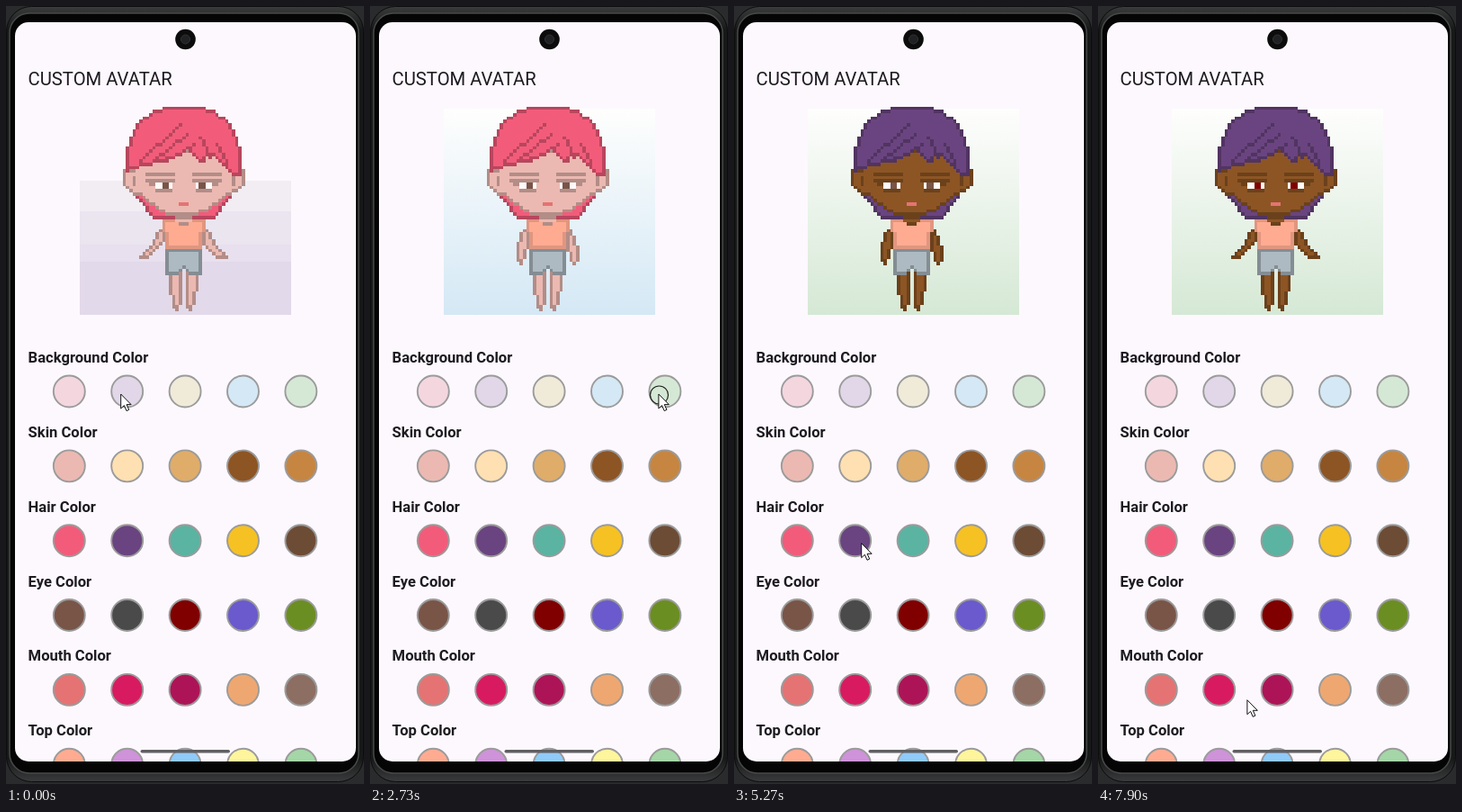
An HTML page with a canvas that plays this animation: 398 px wide and 864 px high, repeating every 8000 ms.

```html
<!DOCTYPE html>
<html lang="en">
<head>
<meta charset="utf-8">
<title>Custom avatar</title>
<style>
  html, body { margin: 0; width: 398px; height: 864px; overflow: hidden; background: #2a2b2c; }
  svg, canvas, #backdrop { position: absolute; left: 0; top: 0; }
  #backdrop { left: 82px; top: 114px; width: 235px; height: 229px; }
  #avatar { left: 82px; top: 108px; width: 235px; height: 235px; image-rendering: pixelated; }
  text { font-family: Roboto, Arial, sans-serif; fill: #1d1b20; }
  .title { font-size: 20.25px; }
  .label { font-size: 16.6px; font-weight: 700; }
</style>
</head>
<body>
<svg width="398" height="864">
  <defs>
    <clipPath id="clip"><rect x="10" y="18" width="379" height="821" rx="15"/></clipPath>
    <linearGradient id="rim" x2="0" y2="1">
      <stop offset="0" stop-color="#3a3b3c"/><stop offset=".03" stop-color="#171818"/>
      <stop offset=".97" stop-color="#171818"/><stop offset="1" stop-color="#3a3b3c"/>
    </linearGradient>
  </defs>
  <rect x=".5" y=".5" width="397" height="861" rx="28" fill="url(#rim)" stroke="#0c0c0c"/>
  <rect x="4" y="8" width="388" height="844" rx="22" fill="#050505" stroke="#48494a" stroke-width="1.5"/>
  <rect x="10" y="18" width="379" height="821" rx="15" fill="#fdf8fe"/>
  <circle cx="199.5" cy="37" r="11.3" fill="#0c0c0c"/>
  <circle cx="199.5" cy="37" r="5" fill="#1f2123" stroke="#303234"/>
  <text class="title" x="24.5" y="88">CUSTOM AVATAR</text>
  <g id="swatches" clip-path="url(#clip)"></g>
  <rect x="149.5" y="826" width="99.5" height="3.6" rx="1.8" fill="#615f64"/>
</svg>
<div id="backdrop"></div>
<canvas id="avatar" width="64" height="64"></canvas>
<svg width="398" height="864">
  <g id="cursor">
    <circle id="press" cx=".6" cy="1" r="10" fill="none" stroke="#222" stroke-width="1.2"/>
    <path d="M0 0V16L3.7 12.6 6.3 18.6 9 17.4 6.4 11.6H11.4Z" fill="#fff" stroke="#111" stroke-linejoin="round"/>
  </g>
</svg>
<script>
const LOOP = 8000, TRAVEL = 600, PRESS = 140;
const $ = id => document.getElementById(id);

const palettes = {
  Background: '#f4d6df #e1d7e8 #f0ead9 #d4e8f5 #d5e8d5',
  Skin: '#ebb9b1 #ffe0b2 #e0ac69 #8d5524 #c68642',
  Hair: '#f25c7a #6a4480 #5bb3a2 #f6c122 #6d4c36',
  Eye: '#795548 #4a4a4a #800000 #6a5acd #6b8e23',
  Mouth: '#e57373 #d81b60 #ad1457 #efa771 #8d6e63',
  Top: '#ffab91 #ce93d8 #90caf9 #fff59d #a5d6a7'
};
const names = Object.keys(palettes);
const colors = names.map(n => palettes[n].split(' '));
const colX = col => 70.3 + col * 64.4;
const rowY = row => 428 + row * 82.85;

$('swatches').innerHTML = names.map((name, row) =>
  `<text class="label" x="24.6" y="${rowY(row) - 32}">${name} Color</text>` +
  colors[row].map((c, col) =>
    `<circle cx="${colX(col)}" cy="${rowY(row)}" r="17.5" fill="${c}" stroke="#9b9b9b" stroke-width="1.9"/>`).join('')
).join('');

// Each visit: when the cursor leaves for a swatch, and when it taps it
const visits = [
  { go: -TRAVEL, row: 0, col: 1, dx: -7 },
  { go: 110, tap: 700, row: 0, col: 2, dx: -7 },
  { go: 710, tap: 1800, row: 0, col: 3, dx: -7 },
  { go: 1980, tap: 2710, row: 0, col: 4, dx: -7 },
  { go: 3010, tap: 3950, row: 1, col: 3, dx: 7 },
  { go: 4240, tap: 5010, row: 2, col: 1, dx: 7 },
  { go: 5930, tap: 6730, row: 3, col: 2, dx: -1 },
  { go: 7300, row: 4.1, col: 1.5, dx: -1 }
];

function cursorAt(t) {
  let x = 0, y = 0;
  for (const v of visits) {
    const k = Math.min(1, Math.max(0, (t - v.go) / TRAVEL));
    x += (colX(v.col) + v.dx - x) * k;
    y += (rowY(v.row) + 3 - y) * k;
  }
  return `translate(${x.toFixed(1)} ${y.toFixed(1)})`;
}

// Chosen swatch column per row
function choices(t) {
  const picked = [1, 0, 0, 0, 0, 0];
  for (const v of visits) if (t >= v.tap + PRESS) picked[v.row] = v.col;
  return picked;
}

// Pixel drawing on a 64 x 64 grid, symmetric about x = 31.5
const ctx = $('avatar').getContext('2d');
const pts = s => s.split(' ').map(p => p.split(',').map(Number));
const flip = p => p.map(([x, y]) => [63 - x, y]).reverse();
const both = p => [...p, ...flip(p)];
const shade = (hex, k = .76) =>
  `rgb(${[1, 3, 5].map(i => Math.round(parseInt(hex.slice(i, i + 2), 16) * k))})`;

function box(color, x, y, w, h) {
  ctx.fillStyle = color;
  ctx.fillRect(x, y, w, h);
}
function pair(color, x, y, w, h) {
  box(color, x, y, w, h);
  box(color, 63 - x - w, y, w, h);
}
function inside(poly, x, y) {
  let hit = false;
  poly.forEach(([ax, ay], i) => {
    const [bx, by] = poly[(i || poly.length) - 1];
    if (ay > y !== by > y && x < (bx - ax) * (y - ay) / (by - ay) + ax) hit = !hit;
  });
  return hit;
}
// Fills a polygon cell by cell and darkens its border cells
function shape(color, poly, edge = shade(color)) {
  const has = (x, y) => inside(poly, x + .5, y + .5);
  for (let y = 0; y < 64; y++)
    for (let x = 0; x < 64; x++)
      if (has(x, y)) {
        const inner = has(x - 1, y) && has(x + 1, y) && has(x, y - 1) && has(x, y + 1);
        box(inner ? color : edge, x, y, 1, 1);
      }
}
function limb(color, poly) {
  shape(color, poly);
  shape(color, flip(poly));
}
function line(color, x, y, dx, dy) {
  const n = Math.max(Math.abs(dx), Math.abs(dy));
  for (let i = 0; i <= n; i++)
    box(color, Math.round(x + dx * i / n), Math.round(y + dy * i / n), 1, 1);
}

// Left half of the head: a squarish quarter ellipse, then straight down
const skull = Array.from({ length: 13 }, (_, i) => {
  const a = (1 - i / 12) * Math.PI / 2;
  return [31.5 - 17.5 * Math.cos(a) ** .85, 18 - 17.2 * Math.sin(a) ** .85];
}).concat([[14, 21]]);
const fringe = pts('17,20 20,19 25,18 31,16 33,14 35,16 36,18 38,18 38,16 40,16 43,18 46,22 49,22');
const hairTop = [...skull, ...fringe, ...flip(skull)];
const hairBack = both(pts('17,26 17,28 20,32 22,35 27,35'));
const face = both(pts('17,14 17,20 13,20 13,24 15,27 18,28 22,31 25,33 28,34'));
const armOut = pts('24,38 26,38 26,42 21,47 18,47 18,46 20,45 22,42');
const armDown = pts('24,38 26,38 26,43 24,49 23,49 22,47 22,44 23,41');
const leg = pts('27,51 31,51 31,60 30,63 29,63 28,60 27,55');
const shorts = both(pts('26,44 26,52 30,52 31,50'));
const shirt = both(pts('28,35 25,35 25,38 26,40 26,44'));

function drawAvatar([skin, hair, iris, mouth, top], wide) {
  const dark = shade(skin), lock = shade(hair), cloth = '#aebac2';
  ctx.clearRect(0, 0, 64, 64);
  shape(hair, hairBack);
  limb(skin, wide ? armOut : armDown);
  limb(skin, leg);
  shape(cloth, shorts);
  shape(top, shirt, shade(top, .88));
  box(skin, 29, 35, 5, 1);
  box(dark, 29, 34, 5, 1);
  box(dark, 30, 36, 3, 1);
  shape(skin, face);
  pair(dark, 16, 22, 1, 3);
  pair(dark, 20, 21, 9, 1);
  pair(dark, 20, 23, 9, 1);
  pair(dark, 21, 24, 2, 1);
  pair(dark, 23, 26, 5, 1);
  pair('#fdfafa', 23, 24, 5, 2);
  pair(iris, 25, 24, 2, 2);
  box(mouth, 30, 30, 3, 1);
  shape(hair, hairTop);
  for (let i = 0; i < 3; i++) line(lock, 18 + i * 4, 17, 12 - i * 2, 3 * i - 11);
  for (let i = 0; i < 2; i++) line(lock, 36 + i * 5, 10 + i * 2, 3, 6);
}

// The opening tint shows as coarse bands, later ones as a smooth fade
function backdrop(tint, first) {
  return first
    ? 'linear-gradient(transparent 80px, #f1edf3 0 114px, #ebe5f0 0 151px, #e8e0ee 0 170px, #e2d9ea 0)'
    : `linear-gradient(#fefefd, ${tint})`;
}

let last = '';
function render(t) {
  $('cursor').setAttribute('transform', cursorAt(t));
  const pressed = visits.some(v => t >= v.tap && t < v.tap + PRESS);
  $('press').style.display = pressed ? '' : 'none';

  const picked = choices(t);
  const wide = (t + 240) % 1550 < 620;
  const key = picked.join() + wide;
  if (key === last) return;
  last = key;
  const [tint, ...look] = picked.map((col, row) => colors[row][col]);
  drawAvatar(look, wide);
  $('backdrop').style.background = backdrop(tint, picked[0] === 1);
}
const start = performance.now();
function loop() {
  render((performance.now() - start) % LOOP);
  requestAnimationFrame(loop);
}
loop();
</script>
</body>
</html>
```
